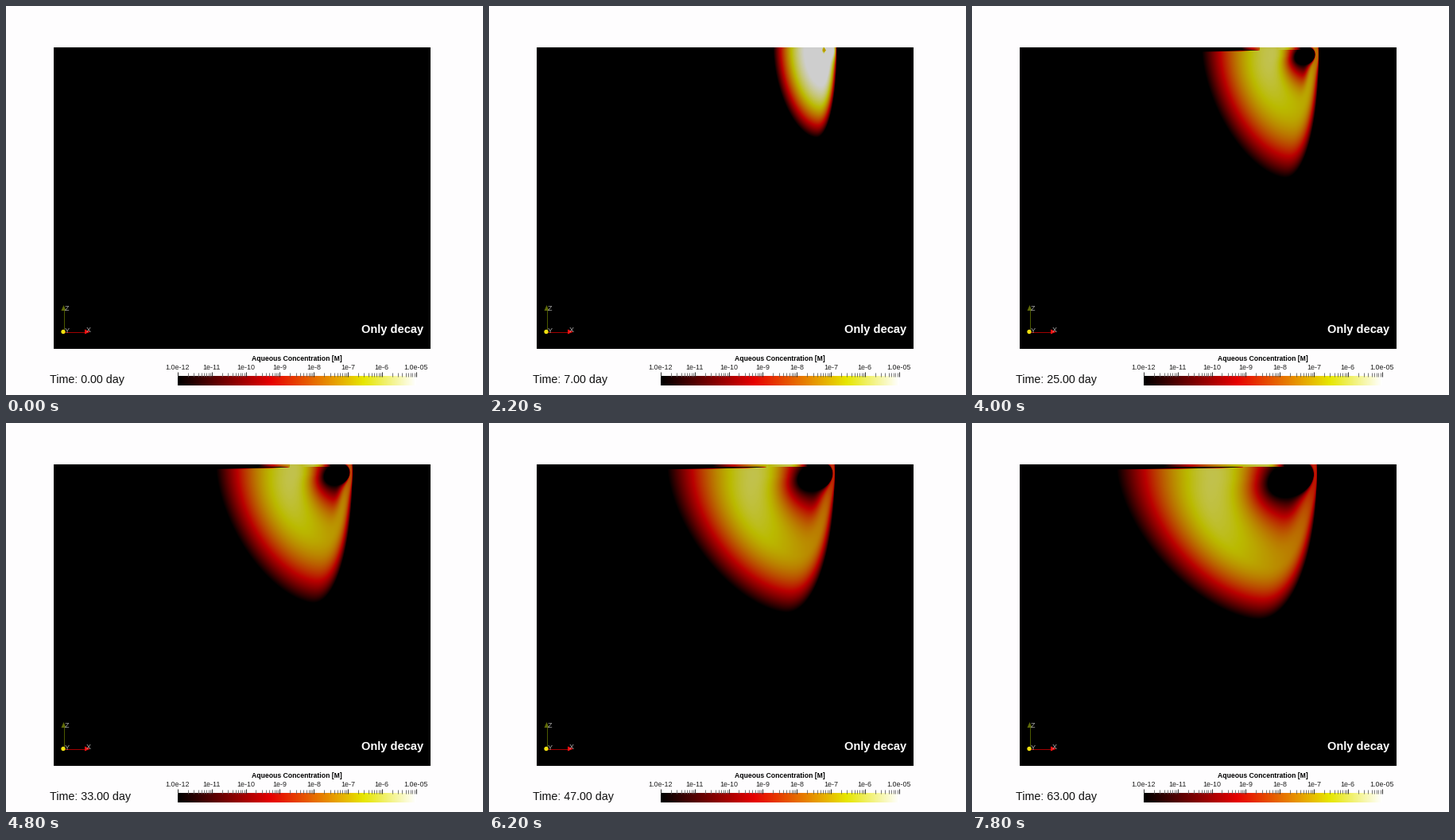
A matplotlib script that plays this animation: 600 by 489 pixels, repeating every 8 s.

```python
import numpy as np
import matplotlib.pyplot as plt
from matplotlib.animation import FuncAnimation
from matplotlib.colors import LinearSegmentedColormap
from matplotlib.patches import Circle, Polygon, Rectangle

W, H, DPI = 600, 489, 128
FRAMES, STEP = 40, 200
X0, X1, Y0, Y1 = 150, 450, 52, 262      # part of the domain the plume can reach
RELEASE = 5                             # day on which the inflow stops
SHADE = 0.81
PAPER = "#fefdfe"

plt.rcParams["font.family"] = "Liberation Sans"
heat = LinearSegmentedColormap.from_list("heat", [
    (0, (0, 0, 0)), (0.39, (0.902, 0, 0)), (0.78, (0.902, 0.902, 0)), (1, (1, 1, 1))], N=512)

px, py = np.meshgrid(np.arange(X0, X1) + 0.5, np.arange(Y0, Y1) + 0.5)
ray = np.linspace(-np.pi, np.pi, 1441)


def day_at(i):
    return 0.5 * i if i <= 10 else 2.0 * i - 15


def relax(t, start, end, tau):
    return end + (start - end) * np.exp(-t / tau)


def rim_radius(day, left, hx, hy):
    """Distance from (hx, hy) to the plume's rim along each ray."""
    low_x = 420 - 1.45 * day ** 0.9
    depth = 220 * (1 - np.exp(-0.2735 * np.sqrt(day)))
    right = 438 - 0.06 * day
    top = relax(day, Y0, 57, 20)
    bend = relax(day, 1.9, 1.6, 12)

    lo, hi = np.zeros_like(ray), np.full_like(ray, 450.0)
    for _ in range(24):
        r = (lo + hi) / 2
        dx = hx + r * np.cos(ray) - low_x
        dy = np.maximum(hy + r * np.sin(ray) - top, 0) / (Y0 + depth - top)
        half = np.where(dx < 0, low_x - left, right - low_x)
        p = np.where(dx < 0, bend, 2.1)
        inside = (np.abs(dx) / half) ** p + dy ** p < 1
        lo, hi = np.where(inside, r, lo), np.where(inside, hi, r)
    return lo


def hole_radius(a, b, tilt=np.radians(-25)):
    return a * b / np.hypot(b * np.cos(ray - tilt), a * np.sin(ray - tilt))


def top_layer(level, day, left):
    """Thin surface layer: a dark wedge under a narrow bright streak."""
    crest = 425 - 7 * np.sqrt(day)
    reach = np.clip((crest - 28 - px) / (crest - 28 - left), 0, None)
    edge = np.where(reach > 0, 55 + relax(day, 0, 3.5, 20) * np.sqrt(reach), Y0 - 2)
    level = level * np.clip(py - edge + 0.5, 0, 1)
    span = np.where(px < crest, 2.05 * day, 24)
    streak = 0.85 * np.clip(1 - ((px - crest) / span) ** 2, 0, 1)
    return np.where(py < 55, np.maximum(level, streak), level)


def plume(day):
    if day == 0:
        return np.zeros_like(px)
    age = max(day - RELEASE, 0)
    drained = min(age / 6, 1)
    left = 416 - 1.4 * day - 18.4 * np.sqrt(day)

    # Clean water spreads from the inflow as a tilted ellipse
    hx, hy = 422 - day ** 2 / 190, Y0 + 2.4 * np.sqrt(age)
    a = 0.01 + drained * (2 + 0.44 * day)
    b = 0.01 + drained * (3.3 + 0.29 * day)

    dx, dy = px - hx, py - hy
    angle = np.arctan2(dy, dx)
    r_in = np.interp(angle, ray, hole_radius(a, b))
    r_out = np.interp(angle, ray, rim_radius(day, left, hx, hy))
    u = (np.hypot(dx, dy) - r_in) / np.maximum(r_out - r_in, 0.5)

    # Strongest on the left, weakest along the right-hand rim
    side = (1 - np.cos(angle)) / 2
    weak = relax(age, 1.15, 0.42, 15)
    peak = weak + (relax(age, 1.15, 0.86, 5) - weak) * side
    ridge = relax(age, 0, 0.4, 20) * (1 + 0.5 * np.maximum(np.sin(angle), 0))
    power = relax(age, 3, 1.7, 12) + 5 * (1 - side) ** 6

    fall = np.clip((u - ridge) / (1 - ridge), 0, 1) ** power
    rise = np.clip((ridge - u) / np.maximum(ridge, 1e-3), 0, 1) ** 2.5
    level = np.clip(peak * (1 - fall - drained * rise), 0, 1)
    return top_layer(level, day, left) if drained == 1 else level


def shaded(day):
    return heat(plume(day))[..., :3] * SHADE


fig = plt.figure(figsize=(W / DPI, H / DPI), dpi=DPI, facecolor=PAPER)
ax = fig.add_axes([0, 0, 1, 1])


def label(x, y, text, size, color="black", **kw):
    return ax.text(x, y, text, fontsize=size * 72 / DPI, color=color, **kw)


def line(xs, ys, color, width=1):
    ax.plot(xs, ys, color=color, lw=width * 72 / DPI, solid_capstyle="butt", zorder=3)


# Domain
ax.add_patch(Rectangle((59.5, 51.5), 474.5, 379.5, fc="black", lw=0, zorder=1))
field = ax.imshow(shaded(0), extent=(X0, X1, Y1, Y0), interpolation="nearest",
                  aspect="auto", zorder=2)
label(447, 411, "Only decay", 14.6, "white", weight="bold", zorder=4)

# Orientation axes
line([72.5, 72.5], [409, 382], "#4c5a00")
line([72, 100], [409.5, 409.5], "#a00000")
ax.add_patch(Polygon([(69.5, 383), (75.5, 383), (72.5, 376)], fc="#5f6a08", lw=0, zorder=3))
ax.add_patch(Polygon([(99, 406.5), (99, 412.5), (106, 409.5)], fc="#f01010", lw=0, zorder=3))
ax.add_patch(Circle((72, 409.5), 2.7, fc="#f0e010", lw=0, zorder=4))
for x, y, name in [(76.5, 379.5, "Z"), (104, 406.5, "X"), (76.5, 407.5, "Y")]:
    label(x, y, name, 9, "#a8a8a8", ha="center", va="center_baseline", zorder=4)

# Colour bar with logarithmic ticks
BAR_X, BAR_W = 216, 299.5
decade = BAR_W / 7
ax.imshow(np.linspace(0, 1, 300)[None, :], cmap=heat, extent=(BAR_X, BAR_X + BAR_W, 477.5, 465.5),
          aspect="auto", zorder=2)
for d in range(8):
    x = BAR_X + d * decade
    line([x, x], [460, 466], "#303030")
    if d < 7:
        for k in range(2, 10):
            xm = x + decade * np.log10(k)
            line([xm, xm], [461, 466], "#585858", 0.8)
    text = {0: "1.0e-12", 7: "1.0e-05"}.get(d, f"1e-{12 - d}")
    label(x, 457, text, 8.9, "#202020", ha="center")
label(365.5, 446.5, "Aqueous Concentration [M]", 8.6, weight="bold", ha="center")

clock = label(55, 474, "", 14.2, "#101010")

ax.set_xlim(0, W)
ax.set_ylim(H, 0)
ax.axis("off")


def draw(i):
    day = day_at(i)
    field.set_data(shaded(day))
    clock.set_text(f"Time: {day:.2f} day")
    return field, clock


anim = FuncAnimation(fig, draw, frames=FRAMES, interval=STEP, repeat=True, repeat_delay=0)
plt.show()
```
